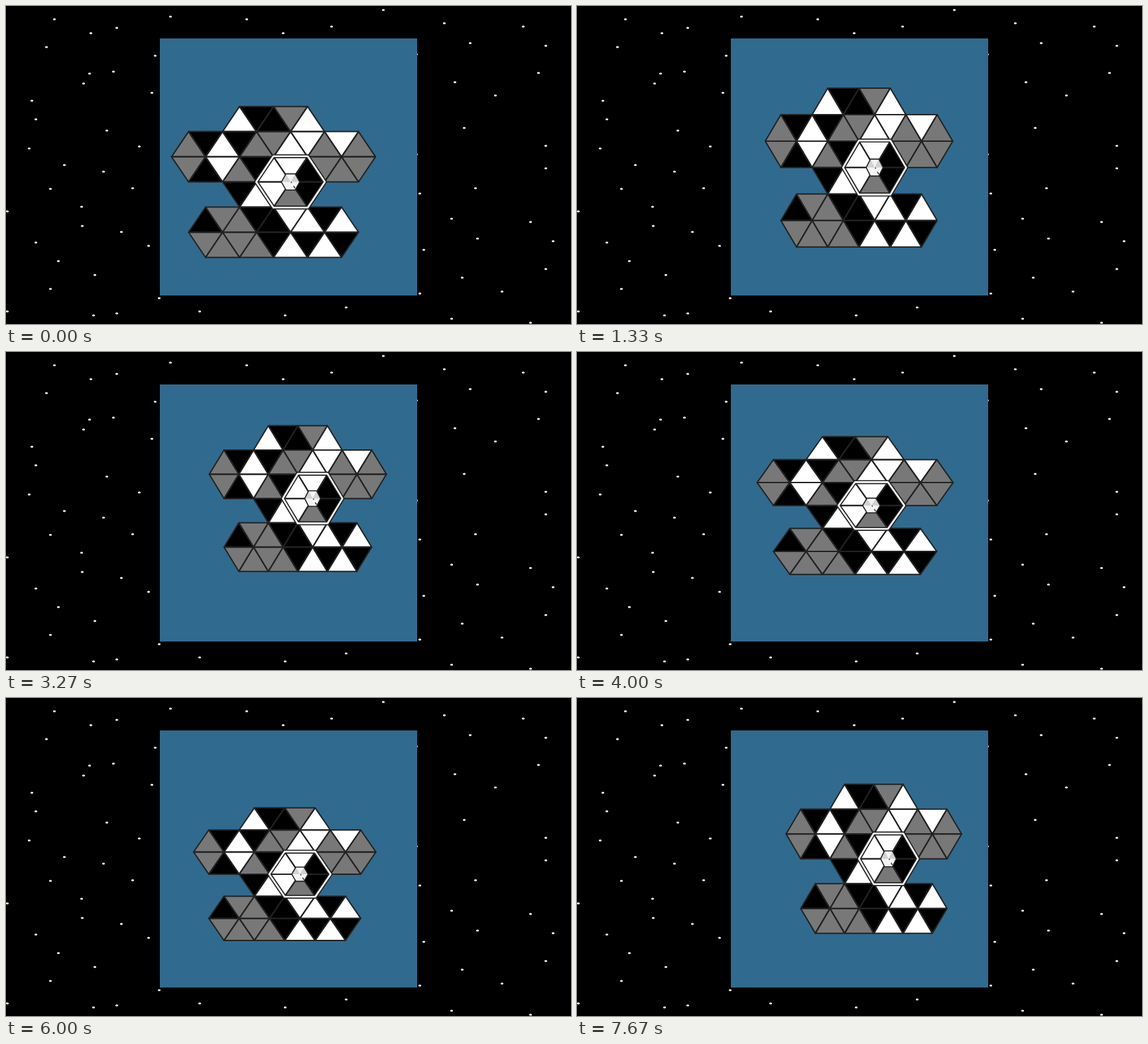
Write an HTML page with a canvas that moves like this. It is 852 px wide and 480 px high and loops after 7740 ms.

```html
<!DOCTYPE html>
<html lang="en">
<head>
<meta charset="utf-8">
<title>Hexagon board</title>
<style>
html, body { margin: 0; width: 100%; height: 100%; overflow: hidden; background: #000; }
canvas { display: block; }
</style>
</head>
<body>
<canvas id="stage" width="852" height="480"></canvas>
<script>
const ctx = document.getElementById('stage').getContext('2d');
const LOOP = 7740;
const FILL = { K: '#000', G: '#787878', W: '#fff' };
const LINE = '#222';

// Each row: first column, colours from left to right, whether the first triangle points up.
const ROWS = [
  [3, 'WKKGW', true],
  [0, 'GKWKGGWWGWG', true],
  [0, 'GKWGKWWKGGG', false],
  [3, 'KWWGK', false],
  [1, 'KGGKKWWKW', true],
  [1, 'GGGGKWKWK', false]
];

const STARS = [
  73,20, 248,16, 363,20, 569,6, 661,26, 780,31, 128,41, 167,33,
  418,41, 491,31, 700,56, 814,60, 61,62, 225,75, 126,102, 162,99,
  117,117, 220,131, 39,143, 677,115, 803,101, 738,135, 45,171, 152,188,
  35,215, 201,212, 691,184, 814,211, 88,240, 814,245, 147,250, 67,276,
  191,275, 624,283, 708,275, 2,310, 114,303, 115,332, 672,321, 791,326,
  45,357, 174,341, 215,362, 711,351, 825,355, 630,368, 79,385, 134,406,
  688,410, 814,397, 67,427, 231,441, 624,434, 748,431, 2,461, 132,467,
  167,464, 292,461, 421,467, 513,455, 672,472, 791,478, 619,73, 619,224
];

function drawSky() {
  ctx.fillStyle = '#000';
  ctx.fillRect(0, 0, 852, 480);
  ctx.fillStyle = '#fff';
  for (let i = 0; i < STARS.length; i += 2) {
    ctx.beginPath();
    ctx.ellipse(STARS[i], STARS[i + 1], 2.1, 1.5, 0, 0, Math.PI * 2);
    ctx.fill();
  }
  ctx.fillStyle = '#316a8f';
  ctx.fillRect(232, 49, 388, 388);
}

function poly(points) {
  ctx.beginPath();
  for (const [x, y] of points) ctx.lineTo(x, y);
  ctx.closePath();
}

function stroke(color, width) {
  ctx.strokeStyle = color;
  ctx.lineWidth = width;
  ctx.stroke();
}

// Independent sways of position and size, in seconds.
function pose(s) {
  return {
    x: 426 - 23 * Math.cos(1.3 * s - 0.195),
    y: 243 + 23 * Math.cos(s + 0.2),
    w: 23.4 + 2.4 * Math.cos(1.405 * s - 0.37),
    h: 36.4 + 3.55 * Math.cos(0.8 * s - 1.114)
  };
}

function drawBoard({ x, y, w, h }) {
  const at = (col, row) => [x + (col - 6) * w, y + (row - 3) * h];
  const hex = (rx, ry) => [[-2, 0], [-1, -1], [1, -1], [2, 0], [1, 1], [-1, 1]]
    .map(([c, r]) => at(7 + c * rx, 3 + r * ry));

  const tiles = [];
  ROWS.forEach(([first, colors, startsUp], row) => {
    [...colors].forEach((color, i) => {
      const col = first + i;
      const up = startsUp === (i % 2 === 0);
      const base = up ? row + 1 : row;
      const tip = up ? row : row + 1;
      tiles.push({ color, points: [at(col, base), at(col + 1, tip), at(col + 2, base)] });
    });
  });

  ctx.lineJoin = 'round';
  for (const tile of tiles) {
    poly(tile.points);
    ctx.fillStyle = FILL[tile.color];
    ctx.fill();
  }
  for (const tile of tiles) {
    poly(tile.points);
    stroke(LINE, 2);
  }

  // Selection ring
  poly(hex(1.01, 1.02));
  stroke(LINE, 6);
  stroke('#fff', 2.6);

  // Hub
  const hub = hex(0.27, 0.32);
  const mid = at(7, 3);
  poly(hub);
  ctx.fillStyle = '#f4f4f4';
  ctx.fill();
  ctx.fillStyle = '#d2d2d2';
  for (const k of [0, 2]) {
    poly([mid, hub[k], hub[k + 1]]);
    ctx.fill();
  }
  poly(hub);
  stroke(LINE, 1.6);
  ctx.fillStyle = '#222';
  ctx.fillRect(mid[0] + 0.5, mid[1], 1.6, 1.6);
  ctx.beginPath();
  ctx.moveTo(mid[0] + 0.18 * w, mid[1] + 0.16 * h);
  ctx.lineTo(mid[0] + 0.26 * w, mid[1] + 0.25 * h);
  stroke(LINE, 1.4);
}

// Fifteen pictures a second, with starts rounded to 10 ms.
function step(ms) {
  let k = Math.floor(ms * 0.015) + 1;
  while (k > 0 && Math.round(k * 20 / 3) * 10 > ms) k--;
  return Math.min(k, 115);
}

function frame() {
  drawSky();
  drawBoard(pose(step((performance.now() - start) % LOOP) / 15));
  requestAnimationFrame(frame);
}

const start = performance.now();
frame();
</script>
</body>
</html>
```
